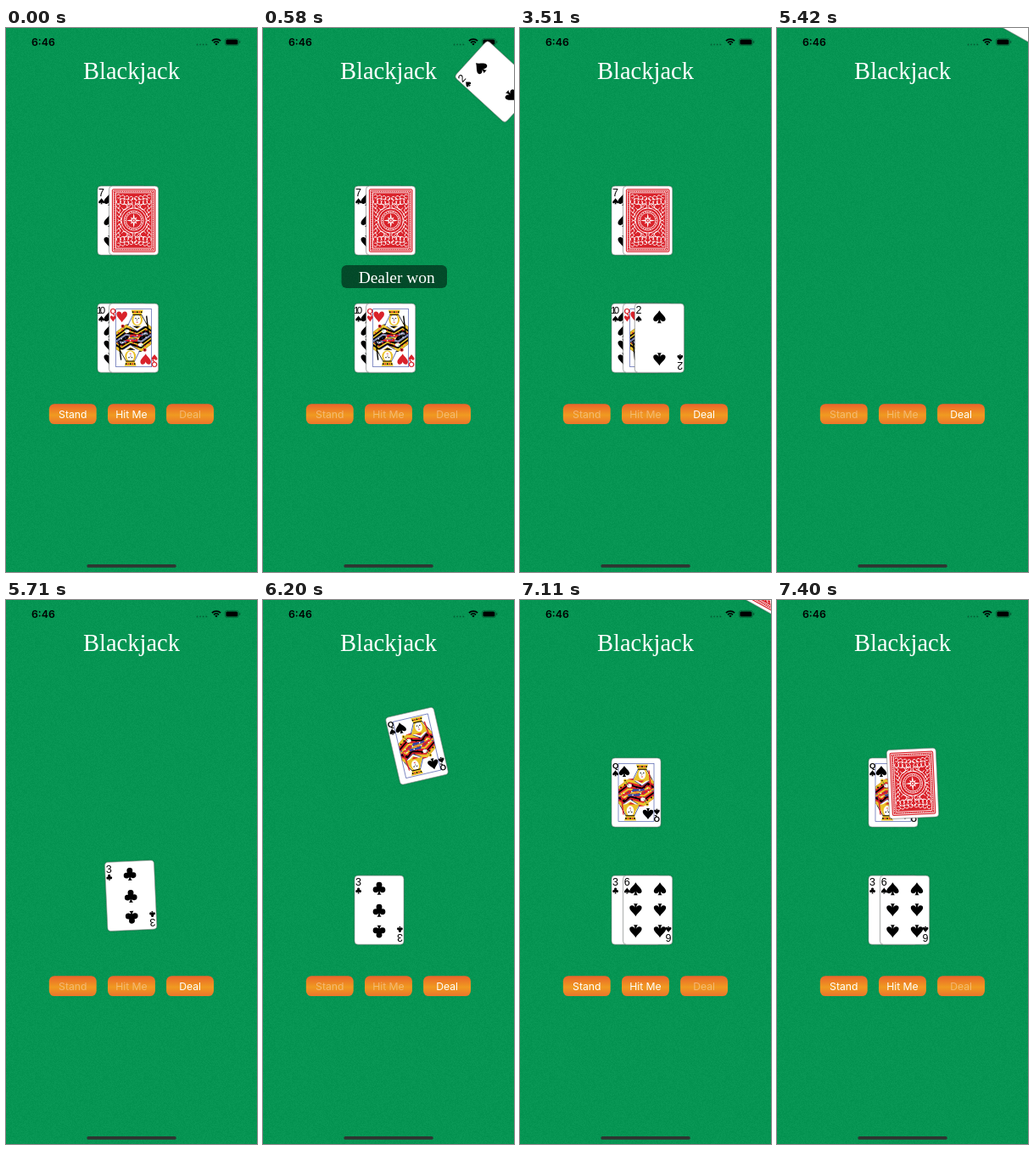
These frames come from a looping animation (296 px wide and 640 px high, 8 s). An HTML page with a canvas:

```html
<!DOCTYPE html>
<html lang="en">
<head>
<meta charset="utf-8">
<title>Blackjack</title>
<style>
  html, body { margin: 0; width: 100%; height: 100%; overflow: hidden; background: #069553; }
  canvas { display: block; width: 296px; height: 640px; }
</style>
</head>
<body>
<canvas id="stage"></canvas>
<script>
const W = 296, H = 640, LOOP = 8000;
const CARD_W = 58, CARD_H = 81;
const canvas = document.getElementById('stage');
const ratio = window.devicePixelRatio || 1;
canvas.width = W * ratio;
canvas.height = H * ratio;
const ctx = canvas.getContext('2d');
ctx.scale(ratio, ratio);

const RED = '#d9222a', GOLD = '#e9c22a', BLUE = '#3546a0', INK = '#000';
const SANS = '"Liberation Sans", Arial, sans-serif';
const UI = 'Inter, Roboto, sans-serif';
const SERIF = '"Liberation Serif", "Times New Roman", serif';

const SUITS = {
  spade: new Path2D('M0-.5C.12-.25 .48-.05 .48 .18C.48 .42 .14 .42 .06 .2C.07 .35 .1 .45 .17 .5L-.17 .5C-.1 .45-.07 .35-.06 .2C-.14 .42-.48 .42-.48 .18C-.48-.05-.12-.25 0-.5Z'),
  heart: new Path2D('M0 .5C-.14 .25-.48 .02-.48-.23C-.48-.55-.08-.55 0-.22C.08-.55 .48-.55 .48-.23C.48 .02 .14 .25 0 .5Z'),
  club: new Path2D('M-.17 .5C-.08 .43-.05 .3-.05 .12L.05 .12C.05 .3 .08 .43 .17 .5Z')
};
for (const [x, y, r] of [[0, -.26, .23], [-.26, .1, .23], [.26, .1, .23], [0, 0, .12]]) {
  SUITS.club.moveTo(x + r, y);
  SUITS.club.arc(x, y, r, 0, Math.PI * 2);
}

function at(x, y, angle, draw) {
  ctx.save();
  ctx.translate(x, y);
  ctx.rotate(angle);
  draw();
  ctx.restore();
}

function box(x, y, w, h, r, fill) {
  ctx.beginPath();
  ctx.roundRect(x, y, w, h, r);
  ctx.fillStyle = fill;
  ctx.fill();
}

function label(text, x, y, font, color, align = 'center') {
  ctx.font = font;
  ctx.fillStyle = color;
  ctx.textAlign = align;
  ctx.fillText(text, x, y);
}

function trace(points, close) {
  ctx.beginPath();
  for (let i = 0; i < points.length; i += 2) ctx.lineTo(points[i], points[i + 1]);
  if (close) ctx.closePath();
}

function shape(points, fill) {
  trace(points, true);
  ctx.fillStyle = fill;
  ctx.fill();
}

function line(points, color, width) {
  trace(points);
  ctx.strokeStyle = color;
  ctx.lineWidth = width;
  ctx.stroke();
}

function disc(x, y, rx, ry, fill) {
  ctx.beginPath();
  ctx.ellipse(x, y, rx, ry, 0, 0, Math.PI * 2);
  ctx.fillStyle = fill;
  ctx.fill();
}

function ring(x, y, r, from = 0, to = Math.PI * 2) {
  ctx.beginPath();
  ctx.arc(x, y, r, from, to);
  ctx.stroke();
}

function pip(suit, x, y, size, flip) {
  at(x, y, flip ? Math.PI : 0, () => {
    ctx.scale(size, size);
    ctx.fillStyle = suit === 'heart' ? RED : INK;
    ctx.fill(SUITS[suit]);
  });
}

// Pip places from the card's centre
const column = (x, rows) => rows.map(y => [x, y]);
const PIPS = {
  2: column(0, [-25, 25]),
  3: column(0, [-25.5, .5, 25.5]),
  6: [...column(-14.3, [-25, 0, 25]), ...column(14.3, [-25, 0, 25])],
  7: [...column(-14.3, [-25, 0, 25]), ...column(14.3, [-25, 0, 25]), [0, -12]],
  10: [...column(-14.3, [-25, -8.5, 8.5, 25]), ...column(14.3, [-25, -8.5, 8.5, 25]), [0, -17], [0, 17]]
};

function corner(rank, suit) {
  const color = suit === 'heart' ? RED : INK;
  if (rank === '10') {
    label('1', -26.8, -28.3, '11.5px ' + SANS, color);
    label('0', -23, -28.3, '11.5px ' + SANS, color);
  } else {
    label(rank, -24.4, -28.3, (rank === 'Q' ? 'bold 9.5px ' : '12.5px ') + SANS, color);
  }
  pip(suit, -24.4, -22.8, 7);
}

function queenHalf(suit) {
  const hearts = suit === 'heart';
  const cx = hearts ? 4 : 7;
  ctx.beginPath();
  ctx.moveTo(-21, -34); ctx.lineTo(21, -34); ctx.lineTo(21, -5); ctx.lineTo(-21, 5);
  ctx.clip();
  // Robe with slanting bands
  shape([-21, 8, -21, -7, -9, -16, 14, -18, 21, -13, 21, 6], hearts ? INK : RED);
  line([-21, -5, -9, -14, cx, -10, 14, -16, 21, -11], GOLD, 3.2);
  line([-21, 0, -9, -9, cx, -5, 14, -11, 21, -6], hearts ? GOLD : INK, 1.6);
  line([-21, 4, -9, -4, cx, -1, 14, -6, 21, -2], hearts ? '#8f96b8' : GOLD, 2.2);
  line([-9, 6, -3, -3, 8, -3, 16, 3], hearts ? RED : BLUE, 2.6);
  line([-12, 8, -5, 0, 8, 0, 16, 5], GOLD, 1.6);
  for (let i = 0; i < 9; i++) {
    disc(-18 + i * 4.6, i % 2 ? -9 : -6, .9, .9, hearts ? RED : INK);
    disc(-19 + i * 4.6, 2 - i, .8, .8, i % 2 ? '#fff' : BLUE);
  }
  line([cx - 9, -15, cx, -9.5, cx + 10, -16], '#fff', 2);
  line([cx - 9, -13.7, cx, -8, cx + 10, -14.7], BLUE, .8);
  // Veil, hair, face and crown
  shape([cx, -33, cx - 11, -14, cx + 12, -14], hearts ? '#fff' : GOLD);
  line([cx - 3, -31, cx - 11, -15], BLUE, .8);
  line([cx + 3, -31, cx + 12, -15], INK, .8);
  disc(cx, -21.5, 6.4, 7, GOLD);
  disc(cx, -21.5, 4.3, 6, '#fff');
  line([cx - 2.5, -23, cx - 1, -23], INK, .9);
  line([cx + 1, -23, cx + 2.5, -23], INK, .9);
  line([cx, -22.5, cx - .5, -20], INK, .4);
  line([cx - 1, -18.5, cx + 1, -18.5], RED, .8);
  shape([cx - 7, -33, cx + 7, -33, cx + 5, -27, cx - 5, -27], GOLD);
  line([cx - 5, -27.3, cx + 5, -27.3], INK, 1);
  for (let i = -2; i <= 2; i++) disc(cx + i * 2.5, -30.5, .9, .9, i % 2 ? RED : INK);
  // Hand and flower
  disc(-8, -8, 2.8, 2.2, '#fff');
  line([-9, -8, -13, -14], '#347b45', .8);
  disc(-13, -14, 2, 2, hearts ? RED : GOLD);
  disc(-13, -14, .8, .8, INK);
  line([15, -26, 18, 0], hearts ? INK : RED, 1.4);
}

function queen(suit) {
  for (const turn of [0, Math.PI]) {
    at(0, 0, turn, () => queenHalf(suit));
    at(0, 0, turn, () => pip(suit, -14, -25, 13));
  }
  ctx.strokeStyle = BLUE;
  ctx.lineWidth = .6;
  ctx.strokeRect(-21, -34, 42, 68);
}

function cardBack() {
  const full = Math.PI * 2;
  box(-25.8, -37.2, 51.6, 74.4, 2, RED);
  ctx.strokeStyle = '#fff';
  ctx.lineWidth = .8;
  ctx.strokeRect(-24.2, -35.6, 48.4, 71.2);
  ctx.strokeRect(-21.2, -32.6, 42.4, 65.2);
  for (let x = -22; x <= 22; x += 2.2) for (const y of [-34.1, 34.1]) disc(x, y, .6, .6, '#fff');
  for (let y = -32; y <= 32; y += 2.2) for (const x of [-22.7, 22.7]) disc(x, y, .6, .6, '#fff');
  for (const sx of [-1, 1]) for (const sy of [-1, 1]) {
    ctx.save();
    ctx.scale(sx, sy);
    ctx.lineWidth = .9;
    for (let i = 0; i < 4; i++) {
      ring(18 - i * 5, 28.5 - i * .8, 2.1, .4, full - .8);
      ring(18 - i * 4.6, 22 - i * .4, 2.5, 2, full + 1);
      ring(18.4 - i * .5, 17 - i * 5, 2, 1, full);
      disc(15.5 - i * 4.6, 25.3, 1, 1, '#fff');
    }
    ring(4, 17, 3, 0, 5);
    ring(11, 16, 3.3, 1, 6);
    ring(0, 0, 17, .35, 1.3);
    ring(0, 0, 14.6, 0, 1.57);
    ctx.restore();
  }
  disc(0, 0, 12, 12, RED);
  ring(0, 0, 11.5);
  ring(0, 0, 9.2);
  for (let i = 0; i < 24; i++) {
    const a = i * full / 24;
    disc(10.3 * Math.cos(a), 10.3 * Math.sin(a), .5, .5, '#fff');
  }
  for (let i = 0; i < 8; i++) {
    at(0, 0, i * full / 8, () => shape([0, i % 2 ? -5.5 : -9, 1.3, -1.5, -1.3, -1.5], '#fff'));
  }
  disc(0, 0, 2, 2, RED);
  disc(0, 0, 1, 1, '#fff');
}

function drawCard(face, x, y, angle) {
  at(x, y, angle, () => {
    ctx.save();
    ctx.shadowColor = 'rgba(0,0,0,.35)';
    ctx.shadowBlur = 2 * ratio;
    box(-CARD_W / 2, -CARD_H / 2, CARD_W, CARD_H, 4, '#fff');
    ctx.restore();
    ctx.strokeStyle = '#8b918d';
    ctx.lineWidth = .6;
    ctx.stroke();
    if (face === 'back') return cardBack();
    const [rank, suit] = face.split(' ');
    if (rank === 'Q') queen(suit);
    else for (const [px, py] of PIPS[rank]) {
      pip(suit, px, py, 15, py > 1 || (rank === '6' && py === 0));
    }
    for (const turn of [0, Math.PI]) at(0, 0, turn, () => corner(rank, suit));
  });
}

// Flight from the deck in five steps: share of the way left in x and y, tilt in degrees
const DECK = { x: 296, y: -17 };
const FLIGHT = [[1, 1, 61], [.84, .79, 47.5], [.58, .497, 29.3], [.28, .225, 13], [.064, .044, 2.6]];
const ROW = { dealer: 226.5, player: 364.7 };

const card = (face, row, slot, start, end, land, gone) =>
  ({ face, x: 137 + slot * 13.7, y: ROW[row], start, end, land, gone });
const CARDS = [
  card('7 spade', 'dealer', 0, 0, 0, 0, 5420),
  card('back', 'dealer', 1, 0, 0, 0, 5420),
  card('10 spade', 'player', 0, 0, 0, 0, 5420),
  card('Q heart', 'player', 1, 0, 0, 0, 5420),
  card('2 spade', 'player', 2, 500, 790, 3510, 5420),
  card('3 club', 'player', 0, 5420, 5710, 5980, LOOP),
  card('Q spade', 'dealer', 0, 5980, 6270, 6540, LOOP),
  card('6 spade', 'player', 1, 6540, 6840, 7110, LOOP),
  card('back', 'dealer', 1, 7110, 7400, LOOP, LOOP)
];

function placeCard(c, t) {
  if (t < c.start || t >= c.gone) return;
  if (t >= c.land) return drawCard(c.face, c.x, c.y, 0);
  const step = Math.min(4, Math.floor((t - c.start) / (c.end - c.start) * 4));
  const [kx, ky, tilt] = FLIGHT[step];
  drawCard(c.face, c.x + (DECK.x - c.x) * kx, c.y + (DECK.y - c.y) * ky, -tilt * Math.PI / 180);
}

function makeFelt() {
  const tile = document.createElement('canvas');
  tile.width = tile.height = 128;
  const g = tile.getContext('2d');
  const img = g.createImageData(128, 128);
  let seed = 7;
  for (let i = 0; i < img.data.length; i += 4) {
    seed = (seed * 1664525 + 1013904223) >>> 0;
    const n = (seed / 4294967296 - .5) * 8;
    img.data[i] = 6 + n;
    img.data[i + 1] = 149 + n;
    img.data[i + 2] = 83 + n;
    img.data[i + 3] = 255;
  }
  g.putImageData(img, 0, 0);
  return ctx.createPattern(tile, 'repeat');
}
const felt = makeFelt();

function statusBar() {
  label('6:46', 30, 21, '600 12.3px ' + UI, INK, 'left');
  for (let i = 0; i < 4; i++) disc(225.5 + i * 3.6, 19.5, .9, .9, 'rgba(0,0,0,.35)');
  ctx.strokeStyle = INK;
  ctx.lineWidth = 1.7;
  for (const r of [4.2, 7.2]) ring(248, 20.3, r, -Math.PI * .75, -Math.PI * .25);
  shape([248, 20.5, 246.3, 18.4, 248, 17.7, 249.7, 18.4], INK);
  ctx.beginPath();
  ctx.roundRect(258.2, 12.4, 16.4, 8.2, 2.5);
  ctx.strokeStyle = 'rgba(0,0,0,.35)';
  ctx.lineWidth = .8;
  ctx.stroke();
  box(259.4, 13.5, 14, 6, 1.5, INK);
  box(275.3, 15.1, 1, 2.8, .5, 'rgba(0,0,0,.4)');
}

function button(text, x, enabled) {
  const fill = ctx.createLinearGradient(0, 442.2, 0, 466.1);
  fill.addColorStop(0, '#ea632b');
  fill.addColorStop(.55, '#f09a20');
  fill.addColorStop(1, '#ea752b');
  box(x, 442.2, 55.9, 23.9, 6.3, fill);
  label(text, x + 27.95, 458.7, '12.2px ' + UI, enabled ? '#fff' : 'rgba(255,255,255,.36)');
}

function render(t) {
  ctx.fillStyle = felt;
  ctx.fillRect(0, 0, W, H);
  statusBar();
  label('Blackjack', 148, 59.5, '28.5px ' + SERIF, '#fff');

  const playing = t < 500 || t >= 7110;
  button('Stand', 50.8, playing);
  button('Hit Me', 120, playing);
  button('Deal', 189.1, t >= 3510 && t < 7110);

  if (t >= 500 && t < 3510) {
    box(92.5, 279, 124.5, 27, 6, 'rgba(0,0,0,.5)');
    label('Dealer won', 157.7, 299.5, '19.4px ' + SERIF, '#fff');
  }
  for (const c of CARDS) placeCard(c, t);
  box(95.3, 631, 105.5, 3.8, 1.9, '#2e3531');
}

function tick() {
  render(performance.now() % LOOP);
  requestAnimationFrame(tick);
}
tick();
</script>
</body>
</html>
```
